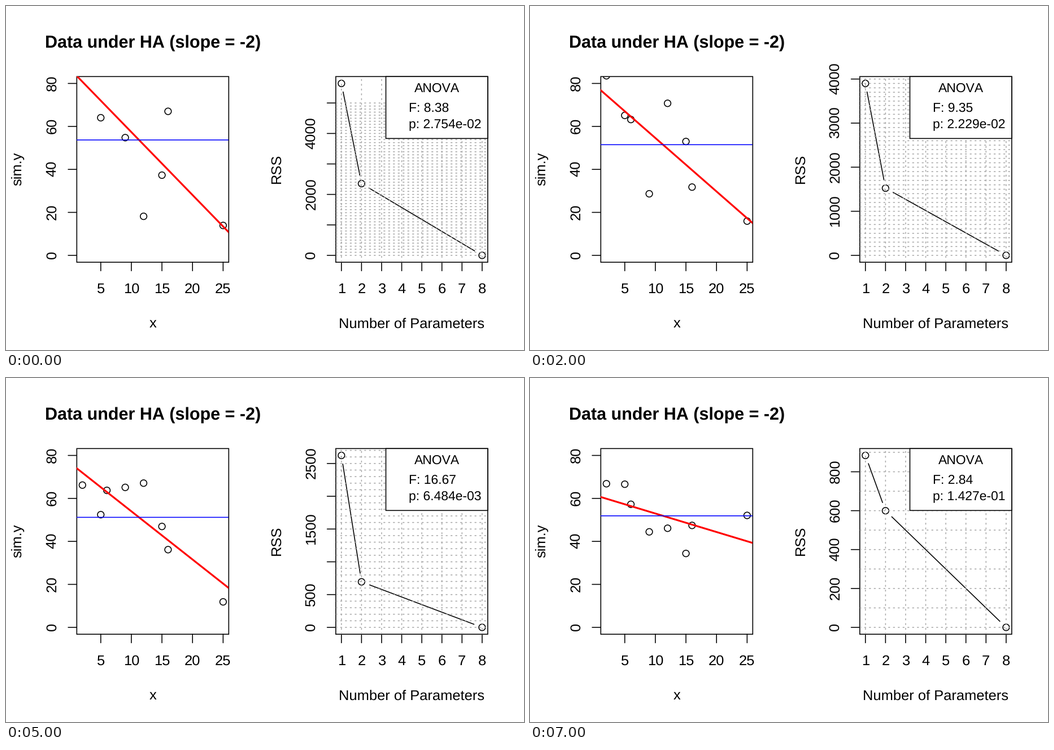
Recreate the animation shown at these times as a matplotlib script. Size 917x611 px, loop 8 s.

```python
import numpy as np
import matplotlib.pyplot as plt
from matplotlib.animation import FuncAnimation
from matplotlib.patches import Circle, Rectangle

W, H, DPI = 917, 611, 100
PT = 72 / DPI               # points per pixel
RES = W / 6                 # pixels per inch of the plot device
LINE = 0.2 * RES            # height of one margin line
EM = RES / 6                # base font size in pixels
LWD = RES / 96
TOP, BOTTOM = 4.1 * LINE, H - 5.1 * LINE
PAD = 0.04 / 1.08           # part of a panel outside the data range

X = np.array([2, 5, 6, 9, 12, 15, 16, 25])
DX = X - X.mean()
SXX = DX @ DX

# one simulation each: mean of y, RSS of the one-parameter model, p value
SIMS = [
    (53.7, 5642, 0.02754),
    (53.0, 2882, 0.00402),
    (51.5, 3900, 0.02229),
    (55.2, 2280, 0.008211),
    (54.65, 3898, 0.007851),
    (51.2, 2623, 0.006484),
    (53.5, 6000, 0.03291),
    (51.9, 884, 0.1427),
]

plt.rcParams.update({
    "font.family": "Liberation Sans",
    "path.snap": False,
    "text.hinting": "none",
    "text.kerning_factor": 6,   # plain advances, no kerning
    "lines.scale_dashes": True,
})
fig = plt.figure(figsize=(W / DPI, H / DPI), dpi=DPI, facecolor="white")
ax = fig.add_axes([0, 0, 1, 1])


def p_value(t):
    """Two-sided p of Student's t with 6 degrees of freedom."""
    cos2 = 6 / (6 + t * t)
    return 1 - np.sqrt(1 - cos2) * (1 + cos2 / 2 + 3 * cos2 ** 2 / 8)


def f_value(p):
    t = np.linspace(0, 10, 20001)
    return np.interp(-p, -p_value(t), t) ** 2


def simulate(mean, slope, rss, seed):
    """Noisy data whose least-squares fit has exactly these statistics."""
    noise = np.random.default_rng(seed).normal(size=len(X))
    noise -= noise.mean()
    noise -= DX * (noise @ DX) / SXX
    return mean + slope * DX + noise * np.sqrt(rss / (noise @ noise))


def line(xs, ys, color="black", width=1, style="-", clip=None):
    art, = ax.plot(xs, ys, color=color, lw=width * LWD * PT, ls=style,
                   solid_capstyle="round", dash_capstyle="round", zorder=1)
    if clip:
        art.set_clip_path(clip)


def text(x, y, s, size=1.0, ha="center", rot=0, weight="normal"):
    ax.text(x, y, s, fontsize=size * EM * PT, ha=ha, va="baseline",
            rotation=rot, rotation_mode="anchor", weight=weight, zorder=1)


def side_text(x, y, s):
    # the renderer sets turned text one pixel low
    text(x, y - 1, s, rot=90)


def box(x0, y0, x1, y1, fill="none"):
    ax.add_patch(Rectangle((x0, y0), x1 - x0, y1 - y0, fc=fill,
                           ec="black", lw=LWD * PT, zorder=1))


class Panel:
    """A plot region with its data scales, axes and labels."""

    def __init__(self, offset, xlim, ymax, xlab, ylab):
        self.left = offset + 4.1 * LINE
        self.right = offset + W / 2 - 2.1 * LINE
        self.mid = (self.left + self.right) / 2
        self.xlim, self.ymax = xlim, ymax
        self.frame = Rectangle((self.left, TOP), self.right - self.left,
                               BOTTOM - TOP, transform=ax.transData)
        text(self.mid, BOTTOM + 3.8 * LINE, xlab)
        side_text(self.left - 3.2 * LINE, (TOP + BOTTOM) / 2, ylab)

    def px(self, x):
        lo, hi = self.xlim
        width = self.right - self.left
        return self.left + width * (PAD + (x - lo) / (hi - lo) / 1.08)

    def py(self, y):
        return BOTTOM - (BOTTOM - TOP) * (PAD + y / self.ymax / 1.08)

    def points(self, xs, ys):
        for x, y in zip(xs, ys):
            dot = Circle((self.px(x), self.py(y)), 5.8, fc="none", ec="black",
                         lw=LWD * PT, zorder=1)
            ax.add_patch(dot)
            dot.set_clip_path(self.frame)

    def axes(self, xticks, yticks):
        for x in xticks:
            line([self.px(x)] * 2, [BOTTOM, BOTTOM + LINE / 2])
            text(self.px(x), BOTTOM + 1.8 * LINE, str(x))
        edge = H
        for y in yticks:
            pos = self.py(y)
            line([self.left - LINE / 2, self.left], [pos, pos])
            # skip a label that would crowd the one below it
            half = 0.278 * EM * len(str(y))
            if edge - (pos + half) >= 0.82 * EM:
                side_text(self.left - 1.2 * LINE, pos, str(y))
                edge = pos - half
        box(self.left, TOP, self.right, BOTTOM)


def draw_data(ys, mean, slope):
    panel = Panel(0, (2, 25), 80, "x", "sim.y")
    text(panel.mid, 74, "Data under HA (slope = -2)", 1.2, weight="bold")
    panel.points(X, ys)
    panel.axes(range(5, 30, 5), range(0, 100, 20))
    ends = np.array([0, 27])
    line(panel.px(ends), panel.py(mean + slope * (ends - X.mean())),
         "red", 2, clip=panel.frame)
    line(panel.px(ends), [panel.py(mean)] * 2, "blue", clip=panel.frame)


def draw_rss(rss1, rss2, f, p):
    panel = Panel(W / 2, (1, 8), rss1, "Number of Parameters", "RSS")
    xs, ys = [1, 2, 8], [rss1, rss2, 0]
    panel.points(xs, ys)
    pts = [np.array([panel.px(x), panel.py(y)]) for x, y in zip(xs, ys)]
    for a, b in zip(pts, pts[1:]):
        gap = (b - a) / np.hypot(*(b - a)) * LINE / 2
        line(*zip(a + gap, b - gap))

    step = 200 if rss1 < 1000 else 500 if rss1 < 3000 else 1000
    panel.axes(range(1, 9), range(0, int(rss1 * 1.04) + 1, step))

    grid = dict(color="darkgray", style=(0, (4 / 3, 4)), clip=panel.frame)
    for y in range(0, 5001, 100):
        if panel.py(y) > TOP:
            line([panel.left, panel.right], [panel.py(y)] * 2, **grid)
    for x in range(1, 9):
        line([panel.px(x)] * 2, [BOTTOM, TOP], **grid)

    x0 = 672.5
    box(x0, TOP, panel.right, 235.3, "white")
    text((x0 + panel.right) / 2, 152.4, "ANOVA", 0.9)
    text(713.4, 188.2, f"F: {f:.2f}", 0.9, "left")
    text(713.4, 216.2, f"p: {p:.3e}", 0.9, "left")


def draw(i):
    ax.clear()
    ax.set(xlim=(0, W), ylim=(H, 0), autoscale_on=False)
    ax.axis("off")
    mean, rss1, p = SIMS[i]
    f = f_value(p)
    rss2 = rss1 / (1 + f / 6)
    slope = -np.sqrt((rss1 - rss2) / SXX)
    draw_data(simulate(mean, slope, rss2, i), mean, slope)
    draw_rss(rss1, rss2, f, p)
    return []


anim = FuncAnimation(fig, draw, frames=len(SIMS), interval=1000,
                     init_func=lambda: [], repeat=True, repeat_delay=0)
plt.show()
```
